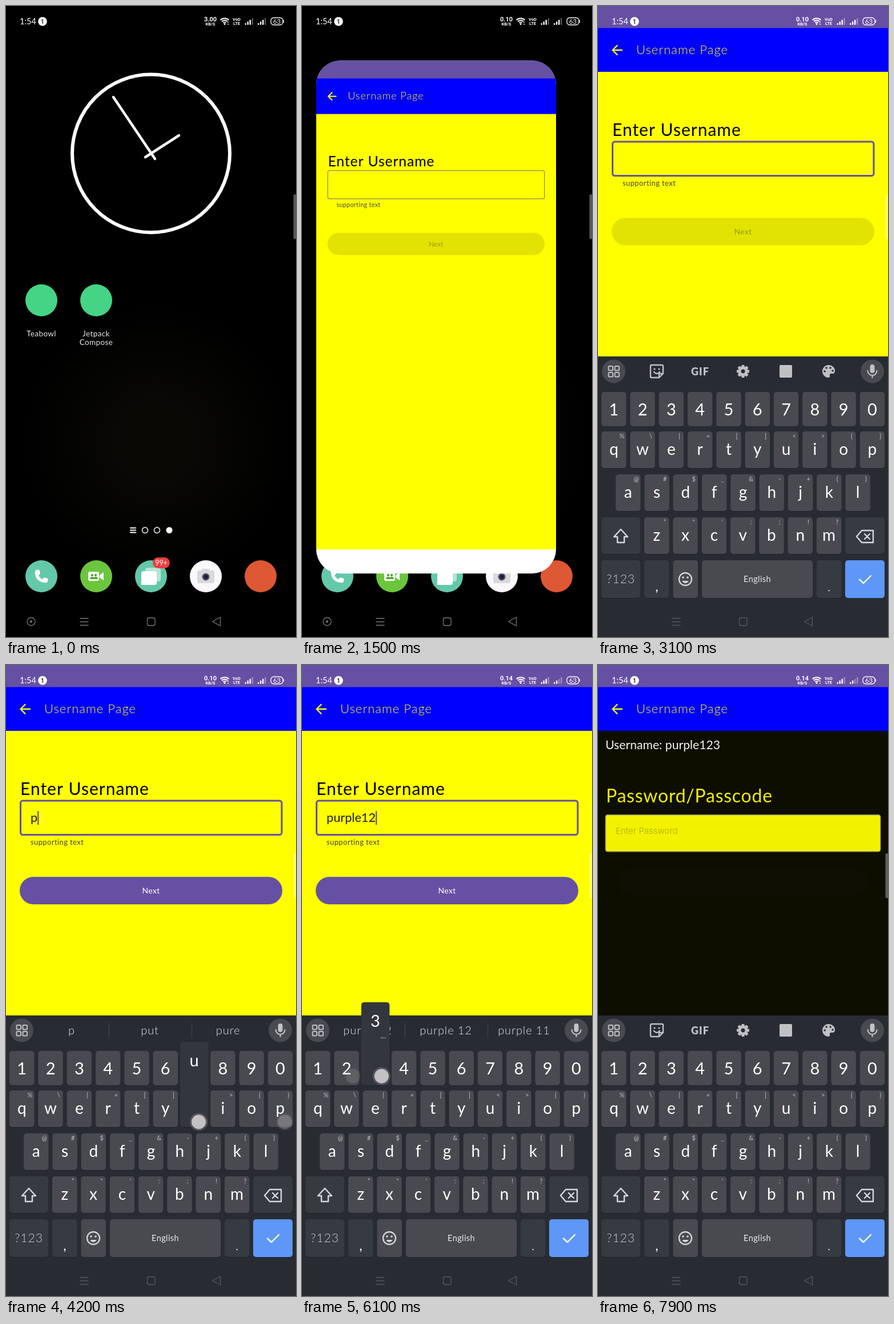
Recreate the animation shown at these times as an HTML page with a canvas. Size 508 by 1102 pixels, loop 8000 ms.

```html
<!DOCTYPE html>
<html lang="en">
<head>
<meta charset="utf-8">
<title>Username form</title>
<style>
html, body { margin: 0; width: 508px; height: 1102px; overflow: hidden; background: #000; }
canvas { display: block; }
</style>
</head>
<body>
<canvas id="stage" width="508" height="1102"></canvas>
<script>
const c = document.getElementById('stage').getContext('2d');
const W = 508, H = 1102, LOOP = 8000;
const PURPLE = '#6650a4', YELLOW = '#ffff00', KEY = '#484a4f', DARK_KEY = '#363a41', ICON = '#bfc1c5';

// ---- helpers ----
const clamp = v => Math.max(0, Math.min(1, v));
const progress = (t, start, length) => clamp((t - start) / length);
const easeOut = u => 1 - (1 - u) ** 2;

// cubic-bezier(.4, 0, .2, 1)
function standardEase(x) {
  let lo = 0, hi = 1, s = .5;
  for (let i = 0; i < 20; i++) {
    s = (lo + hi) / 2;
    const bx = 1.2 * s * (1 - s) ** 2 + .6 * s * s * (1 - s) + s ** 3;
    if (bx < x) lo = s; else hi = s;
  }
  return 3 * s * s * (1 - s) + s ** 3;
}

function text(str, x, y, size, color, { align = 'left', weight = 300, gap = 0, font = 'Lato' } = {}) {
  c.font = `${weight} ${size}px ${font}, sans-serif`;
  c.letterSpacing = gap + 'px';
  c.textAlign = align;
  c.fillStyle = color;
  c.fillText(str, x, y);
}
const centered = (str, x, y, size, color, more) => text(str, x, y, size, color, { align: 'center', ...more });

function box(x, y, w, h, r, fill, stroke, line = 1) {
  c.beginPath();
  c.roundRect(x, y, w, h, r);
  if (fill) { c.fillStyle = fill; c.fill(); }
  if (stroke) { c.strokeStyle = stroke; c.lineWidth = line; c.stroke(); }
}
function disc(x, y, r, fill, stroke, line = 1) {
  c.beginPath();
  c.arc(x, y, r, 0, 7);
  if (fill) { c.fillStyle = fill; c.fill(); }
  if (stroke) { c.strokeStyle = stroke; c.lineWidth = line; c.stroke(); }
}
function path(d, x, y, fill, stroke, line = 2, scale = 1) {
  const p = new Path2D(d);
  c.save();
  c.translate(x, y);
  c.scale(scale, scale);
  c.lineCap = c.lineJoin = 'round';
  if (fill) { c.fillStyle = fill; c.fill(p); }
  if (stroke) { c.strokeStyle = stroke; c.lineWidth = line; c.stroke(p); }
  c.restore();
}
function faded(alpha, draw) {
  c.save();
  c.globalAlpha = alpha;
  draw();
  c.restore();
}

// ---- keyboard layout ----
const ROWS = [
  { keys: '1234567890', hints: '', x: 6, y: 674, h: 60 },
  { keys: 'qwertyuiop', hints: '%\\|=[]<>{}', x: 6, y: 743, h: 64 },
  { keys: 'asdfghjkl', hints: '@#$_&-+()', x: 31, y: 818, h: 64 },
  { keys: 'zxcvbnm', hints: '*"\':;!?', x: 81, y: 893, h: 64 }
];
const PITCH = 50.3, KEY_W = 43.5;
const keyPlace = {};
for (const row of ROWS)
  [...row.keys].forEach((k, i) => keyPlace[k] = { x: row.x + i * PITCH + KEY_W / 2, y: row.y, h: row.h });

// ---- script ----
const NAME = 'purple123';
const STROKES = [[4000, 4090], [4170, 4260], [4350, 4440], [4540, 4630], [4710, 4800], [4830, 4930],
  [5500, 5640], [5780, 5920], [6030, 6180]];
const FOCUS = 2550, LAUNCH = 1200, NAVIGATE = 7400;
const touches = STROKES.map(([down, up], i) => {
  const k = keyPlace[NAME[i]], digit = i > 5;
  return { x: k.x + (digit ? 11 : i === 5 ? -14 : 8), y: k.y + (digit ? 44 : i === 5 ? 30 : 55), down, up };
});
touches.push({ x: 160, y: 522, down: 700, up: 1000 }, { x: 300, y: 268, down: 2400, up: FOCUS },
  { x: 290, y: 396, down: 7100, up: 7220 });

function suggestions(typed) {
  const n = typed.length;
  if (n < 4) return [typed, 'put', 'pure'];
  if (n < 6) return [typed, 'purple', 'purpose'];
  if (n === 6) return ['purple', 'people', 'purples'];
  const digits = typed.slice(6);
  return [typed, 'purple ' + digits, 'purple 1' + (n < 9 ? '1' : '2')];
}

// ---- home screen ----
function drawHome() {
  c.fillStyle = '#000';
  c.fillRect(0, 0, W, H);
  const glow = c.createRadialGradient(265, 760, 60, 265, 760, 240);
  glow.addColorStop(0, '#090805');
  glow.addColorStop(1, '#000');
  c.fillStyle = glow;
  c.fillRect(0, 420, W, 682);

  disc(254, 257.5, 138, null, '#fff', 6);
  path('M244 264L303 226M261 267L188 159', 0, 0, null, '#fff', 4.5);

  disc(62, 514, 28, '#45d486');
  disc(158, 514, 28, '#45d486');
  const label = { gap: .4, weight: 400 };
  centered('Teabowl', 62, 577, 13.5, '#e8e8e8', label);
  centered('Jetpack', 158, 577, 13.5, '#e8e8e8', label);
  centered('Compose', 158, 592, 13.5, '#e8e8e8', label);

  path('M218 911.5H227M218 915.5H227M218 919.5H227', 0, 0, null, '#fff', 2);
  disc(243.5, 915.5, 5, null, '#fff', 1.4);
  disc(264.5, 915.5, 5, null, '#fff', 1.4);
  disc(286, 915.5, 5.5, '#fff');

  ['#64c8aa', '#6cc63d', '#64c8aa', '#faf8fd', '#de5833'].forEach((color, i) => disc(62 + 96 * i, 996, 28, color));
  path('M5 3h4l1.5 5-2.5 2.5q2 4 5.5 5.5l2.5-2.5 5 1.5v4q-1 2-3 2Q3 20 3 6q0-2 2-3z', 47, 981, '#fff', null, 0, 1.25);
  box(144, 988, 19, 16, 3, '#fff');
  path('M164 994l7-5v14l-7-5z', 0, 0, '#fff');
  disc(151, 994, 2.2, '#4ea92c');
  disc(157, 994, 2.2, '#4ea92c');
  path('M147 1001q0-4 4-4t4 4zM153 1001q0-4 4-4t4 4z', 0, 0, '#4ea92c');
  box(244, 981, 27, 24, 4, '#b5e5d7');
  path('M240 987h20q4 0 4 4v16q0 4-4 4h-23v-20q0-4 3-4z', 0, 0, '#fff');
  box(257, 963, 30, 19, 9.5, '#ec3f42');
  centered('99+', 272, 977, 12.5, '#fff', { weight: 400 });
  box(335, 986, 30, 22, 3, '#d9d9dc');
  box(343, 983, 14, 5, 2, '#d9d9dc');
  disc(350, 997, 6.5, '#59566f');
  disc(350, 997, 4, '#201d3c');
}

// ---- app ----
function drawButton(label, x, y, w, h, enabled) {
  box(x, y, w, h, h / 2, enabled ? PURPLE : 'rgba(28,27,31,.12)');
  centered(label, x + w / 2, y + h / 2 + 5, 14, enabled ? '#fff' : 'rgba(28,27,31,.38)', { gap: .3, weight: 400 });
}

function drawUsernamePage(t, typed, lastEdit) {
  const focused = t >= FOCUS;
  text('Enter Username', 25, 227, 30, '#000', { gap: 1, weight: 400 });
  if (focused) box(25.5, 237, 457.5, 59.5, 4, null, PURPLE, 3);
  else box(24.5, 236.5, 459, 60.5, 4, null, '#79747e', 1.3);
  text(typed, 43, 274, 21.7, '#1c1b1f', { weight: 400 });
  if (focused && (t - lastEdit) % 1000 < 500) {
    const end = 43 + (typed ? c.measureText(typed).width : 0);
    c.fillStyle = PURPLE;
    c.fillRect(end, 255, 2.2, 24);
  }
  text('supporting text', 43, 314, 13, '#49454f', { gap: .4, weight: 400 });
  drawButton('Next', 24, 370, 460, 48, typed.length > 0);
}

function drawPasswordPage() {
  c.fillStyle = '#000';
  c.fillRect(0, 115, W, 935);
  text('Username: ' + NAME, 13, 147, 21.2, '#fff', { weight: 400 });
  text('Password/Passcode', 14, 240, 32, YELLOW, { gap: .75, weight: 400 });
  box(13, 261.5, 482, 64.5, 4, YELLOW, '#79747e', 1.3);
  text('Enter Password', 31, 295, 15, '#aaa600', { font: 'Inter' });
  drawButton('Final Page', 36, 357, 436, 46, false);
}

// Both pages cross-fade above a plain yellow backdrop.
function drawApp(t, typed, lastEdit) {
  const swap = standardEase(progress(t, NAVIGATE, 700));
  c.fillStyle = '#fff';
  c.fillRect(0, 0, W, H);
  c.fillStyle = YELLOW;
  c.fillRect(0, 115, W, 935);
  faded(1 - swap, () => drawUsernamePage(t, typed, lastEdit));
  faded(swap, drawPasswordPage);
  c.fillStyle = PURPLE;
  c.fillRect(0, 0, W, 39);
  c.fillStyle = '#0000ff';
  c.fillRect(0, 38.5, W, 76.5);
  path('M42 77H26M33.5 69l-8 8 8 8', 0, 0, null, YELLOW, 2.4);
  text('Username Page', 67, 84, 22, YELLOW, { gap: 1.05 });
}

// The window grows out of its launcher icon.
function drawWindow(p, draw) {
  const mix = (a, b) => a + (b - a) * p;
  const w = mix(66, W), h = mix(66, H), x = mix(158, W / 2) - w / 2, y = mix(512, H / 2) - h / 2;
  c.save();
  c.beginPath();
  c.roundRect(x, y, w, h, p < 1 ? mix(33, 45) : 0);
  c.clip();
  c.translate(x, y);
  c.scale(w / W, h / H);
  draw();
  c.restore();
  if (p < .25) faded(1 - p * 4, () => box(x, y, w, h, 33, '#45d486'));
}

// ---- keyboard ----
function drawTools() {
  path('M94 627h18q2 0 2 2v13l-7 7H94q-2 0-2-2v-18q0-2 2-2zM114 642h-7v7M98 639q5 6 10 0', 0, 0, null, ICON, 2.4);
  disc(99, 634, 1.6, ICON);
  disc(107, 634, 1.6, ICON);
  centered('GIF', 179, 644.5, 18, ICON, { weight: 900, gap: 1 });
  for (let i = 0; i < 4; i++) {
    c.save();
    c.translate(254, 638);
    c.rotate(i * Math.PI / 4);
    box(-2.6, -11, 5.2, 22, 1, ICON);
    c.restore();
  }
  disc(254, 638, 8.5, ICON);
  disc(254, 638, 3.5, '#282c32');
  box(318, 627, 22, 22, 2, ICON);
  path('M404 627a11 11 0 1 0 0 22q3-1 2-4t3-3h3q3-1 3-5a11 10 0 0 0-11-10z', 0, 0, ICON);
  for (const [x, y] of [[397, 638], [400, 632], [407, 632], [411, 637]]) disc(x, y, 1.8, '#282c32');
}

function drawStrip(typed, showTools) {
  disc(27.5, 638, 20.5, KEY);
  for (const dx of [-9, 2]) for (const dy of [-9, 2]) box(27.5 + dx, 638 + dy, 7.5, 7.5, 1.5, null, ICON, 2);
  disc(480.5, 638, 20.5, KEY);
  box(476.5, 626, 8, 15, 4, ICON);
  path('M472.5 637a8 8 0 0 0 16 0M480.5 645v4', 0, 0, null, ICON, 2.2);
  if (showTools) return drawTools();
  suggestions(typed).forEach((word, i) => centered(word, [115, 252, 389][i], 645, 20, '#e2e3e5', { gap: .9 }));
  c.fillStyle = '#44474c';
  c.fillRect(180, 625, 1, 27);
  c.fillRect(325, 625, 1, 27);
}

function drawKey(x, y, w, h, fill = KEY) {
  box(x, y + 1, w, h, 5, '#1f2328');
  box(x, y, w, h, 5, fill);
}

function drawKeyboard(t, typed) {
  c.fillStyle = '#282c32';
  c.fillRect(0, 612, W, 490);
  drawStrip(typed, !typed || t >= NAVIGATE);
  for (const { keys, hints, x, y, h } of ROWS)
    [...keys].forEach((k, i) => {
      const left = x + i * PITCH;
      drawKey(left, y, KEY_W, h);
      centered(k, left + KEY_W / 2, y + (hints ? 41 : 40.5), hints ? 28 : 29, '#fff', { weight: 400 });
      if (hints) centered(hints[i], left + 36, y + 12, 11, '#c4c6ca', { weight: 400 });
    });

  drawKey(6, 893, 68, 64, DARK_KEY);
  path('M40 914l12 13h-6v10h-12v-10h-6z', 0, 0, null, '#d6d8db', 2.4);
  drawKey(433, 893, 69, 64, DARK_KEY);
  path('M462 916h20v21h-20l-9-10.5zM467 922l9 9M476 922l-9 9', 0, 0, null, '#d6d8db', 2.4);

  drawKey(6, 968, 68, 66, DARK_KEY);
  centered('?123', 40, 1008, 21.5, '#c9cbcf', { gap: .8 });
  drawKey(81, 968, KEY_W, 66, DARK_KEY);
  centered(',', 103, 1022, 24, '#fff', { weight: 400 });
  drawKey(131.5, 968, KEY_W, 66);
  disc(153, 1001, 11, null, '#d6d8db', 2.3);
  disc(149, 998, 1.8, '#d6d8db');
  disc(157, 998, 1.8, '#d6d8db');
  path('M147 1004q6 8 12 0z', 0, 0, '#d6d8db');
  drawKey(182, 968, 194, 66);
  centered('English', 279, 1006, 14.5, '#e8e9eb', { gap: .4, weight: 400 });
  drawKey(383, 968, KEY_W, 66, DARK_KEY);
  centered('.', 404.5, 1022, 24, '#fff');
  drawKey(433, 968, 69, 66, '#5e97f6');
  path('M458 1001.5l7 6.5 13-13', 0, 0, null, '#fff', 2.4);

  STROKES.forEach(([down, up], i) => {
    if (t < down || t >= up) return;
    const k = keyPlace[NAME[i]];
    box(k.x - 24.5, k.y - 85, 49.5, 85 + k.h, 5, '#33373d');
    centered(NAME[i], k.x, k.y - 42, 29, '#fff', { weight: 400 });
    if (i > 5) centered('...', k.x + 14, k.y - 22, 13, '#d6d8db', { weight: 400 });
  });
}

// ---- system bars ----
function drawSignal(x, strong) {
  for (let i = 0; i < 4; i++) {
    const h = 3 + i * 3;
    box(x + i * 4, 33 - h, 2.4, h, 1, i < strong ? '#fff' : 'rgba(255,255,255,.35)');
  }
}

function drawStatus(t) {
  const bold = { weight: 700, font: 'Roboto' };
  text('1:54', 24, 32, 14.5, '#fff', { weight: 400 });
  disc(64, 27, 7.8, '#fff');
  centered('1', 64, 31, 11, '#333', bold);
  centered(t < 200 ? '3.00' : t < 4400 ? '0.10' : '0.14', 358, 26.5, 11, '#fff', bold);
  centered('KB/S', 358, 34, 7.5, '#fff', bold);
  for (const r of [10.5, 7, 3.5]) {
    c.beginPath();
    c.arc(383, 32, r, -2.35, -.79);
    c.strokeStyle = '#fff';
    c.lineWidth = 2;
    c.stroke();
  }
  disc(383, 31.5, 1.5, '#fff');
  path('M387.5 29h3l-1.5-2zM387.5 31h3l-1.5 2z', 0, 0, '#fff');
  centered('VoD', 404, 26, 7.5, '#fff', bold);
  centered('LTE', 404, 33, 7.5, '#fff', bold);
  drawSignal(418.5, 3);
  drawSignal(441, t < 5600 ? 3 : 2);
  box(464, 20.5, 21, 12.5, 5, null, '#fff', 1.3);
  c.fillStyle = '#fff';
  c.fillRect(485.5, 24.5, 1.5, 4.5);
  centered('63', 474.5, 31, 11.5, '#fff', { weight: 400 });
}

function drawNav(inApp, overKeyboard) {
  const color = overKeyboard ? '#555960' : '#77787b';
  if (!inApp) {
    disc(44, 1075, 7, null, color, 1.3);
    disc(44, 1075, 2, color);
  }
  path('M130 1069.5H144M130 1075.5H144M130 1081.5H144', 0, 0, null, color, 1.3);
  box(247.5, 1068.5, 13.5, 13.5, 3, null, color, 1.3);
  path('M361.5 1075l14-7.5v15z', 0, 0, null, color, 1.3);
}

function drawTouches(t) {
  for (const { x, y, down, up } of touches) {
    if (t < down || t > up + 250) continue;
    const held = t <= up;
    faded(held ? .85 : .5 * (1 - (t - up) / 250), () => {
      disc(x, y, 15.5, 'rgba(190,180,190,.3)');
      disc(x, y, 12.5, '#d6d3d6');
    });
  }
}

// ---- frame ----
function draw(t) {
  const done = STROKES.filter(s => t >= s[1]);
  const typed = NAME.slice(0, done.length);
  const lastEdit = done.length ? done[done.length - 1][1] : FOCUS;
  const open = easeOut(progress(t, LAUNCH, 543));
  const slide = easeOut(progress(t, 2650, 330));

  if (open < 1) drawHome();
  if (open > 0) drawWindow(open, () => drawApp(t, typed, lastEdit));
  if (slide > 0) {
    c.save();
    c.translate(0, 490 * (1 - slide));
    drawKeyboard(t, typed);
    c.restore();
  }
  drawStatus(t);
  drawNav(open === 1, slide > .3);
  box(503.5, 329, 5, 78, 2, 'rgba(255,255,255,.35)');
  drawTouches(t);
}

function tick() {
  draw(performance.now() % LOOP);
  requestAnimationFrame(tick);
}
tick();
</script>
</body>
</html>
```
